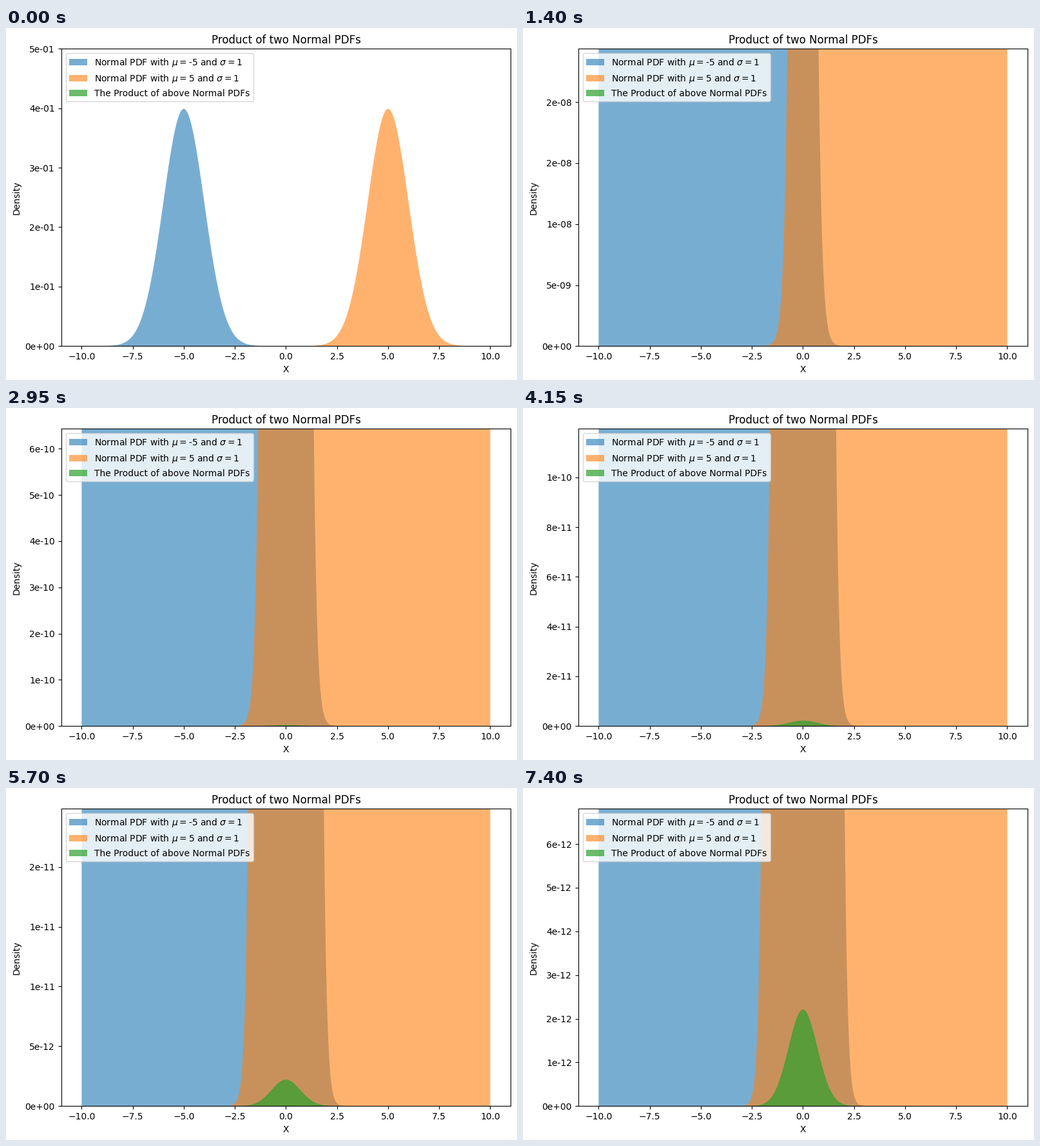
Write a matplotlib script that moves like this. It is 793 px wide and 547 px high and loops after 8200 ms.

```python
import matplotlib.pyplot as plt
import numpy as np
from matplotlib.animation import FuncAnimation
from matplotlib.ticker import FormatStrFormatter

WIDTH, HEIGHT, DPI = 793, 547, 100
STEP_MS = 50
FRAMES = 164
LAST_ZOOM = 148  # the view holds still after this step


def normal_pdf(x, mu, sigma=1):
    z = (x - mu) / sigma
    return np.exp(-z * z / 2) / (sigma * np.sqrt(2 * np.pi))


def top_limit(step):
    return 0.5 / (min(step, LAST_ZOOM) + 1) ** 5


fig = plt.figure(figsize=(WIDTH / DPI, HEIGHT / DPI), dpi=DPI)
ax = fig.add_axes([85.7 / WIDTH, 52.72 / HEIGHT, 697.5 / WIDTH, 462 / HEIGHT])

x = np.linspace(-10, 10, 1000)
product = np.ones_like(x)
for mu in (-5, 5):
    density = normal_pdf(x, mu)
    product *= density
    ax.fill_between(x, density, alpha=0.6,
                    label=rf"Normal PDF with $\mu=${mu} and $\sigma=1$")
ax.fill_between(x, product, alpha=0.7,
                label="The Product of above Normal PDFs")

ax.set_xlim(-11, 11)
ax.set_title("Product of two Normal PDFs")
ax.set_xlabel("X")
ax.set_ylabel("Density")
ax.yaxis.set_major_formatter(FormatStrFormatter("%.0e"))
ax.legend(loc="upper left")


def update(step):
    ax.set_ylim(0, top_limit(step))
    return []


anim = FuncAnimation(fig, update, frames=FRAMES, init_func=lambda: update(0),
                     interval=STEP_MS, repeat=True, repeat_delay=0)
plt.show()
```
